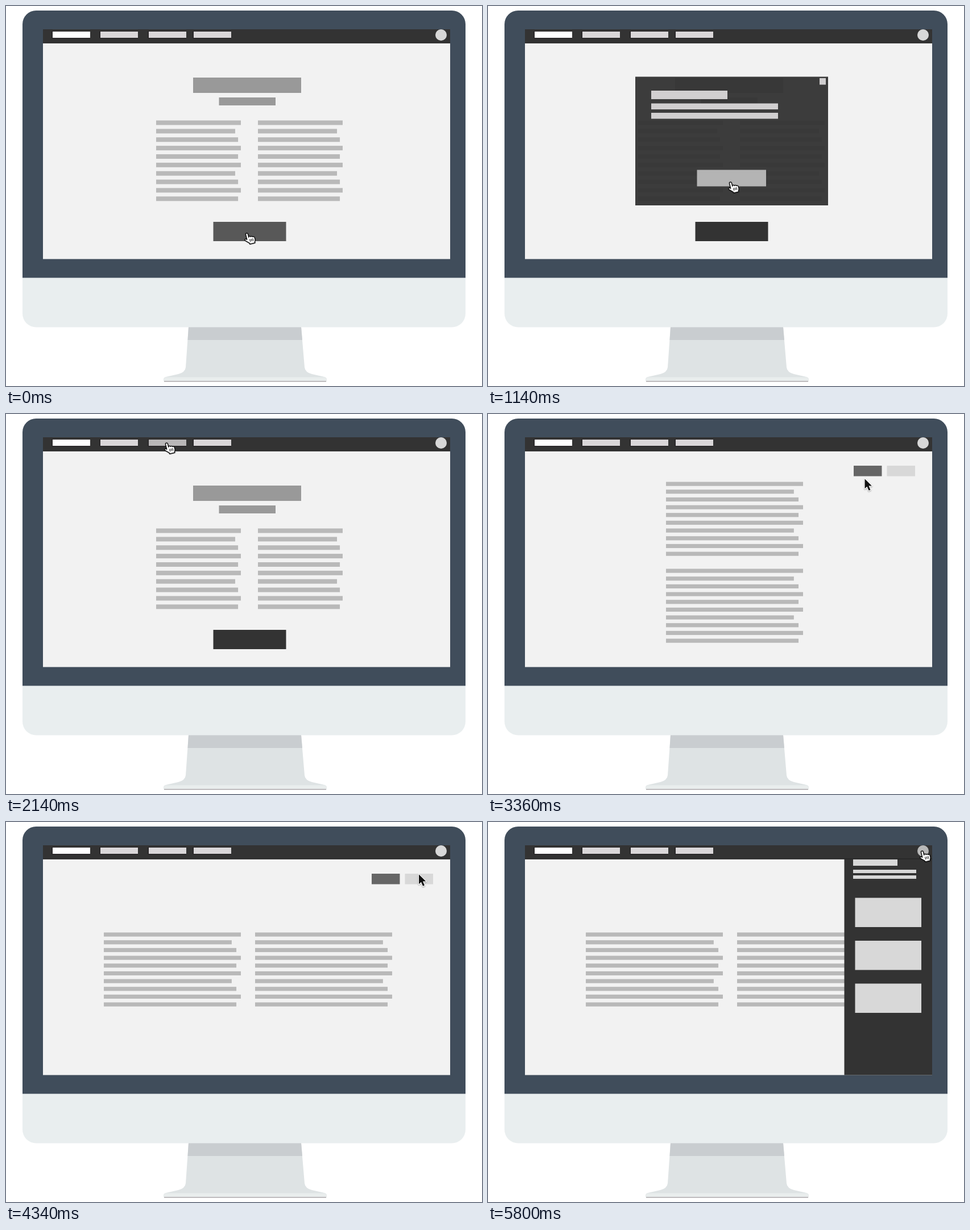
Animation, 837 px wide and 669 px high, one loop 6300 ms. Source, as an HTML page with a canvas:

```html
<!DOCTYPE html>
<html lang="en">
<head>
<meta charset="utf-8">
<title>Wireframe on a desktop screen</title>
<style>
  html, body { margin: 0; width: 100%; height: 100%; overflow: hidden; background: #fff; }
  canvas { display: block; }
</style>
</head>
<body>
<canvas id="stage" width="837" height="669"></canvas>
<script>
const ctx = document.getElementById('stage').getContext('2d');
const LOOP = 6300, STEP = 20;
const DARK = '#333', PANEL = '#f2f2f2', LIGHT = '#dad7d9', CARD = '#d8d8d8', HOVER = '#b9b7b8', LINE = '#b9b9b9';
const ROWS = [1, .933, .967, 1, .967, 1, .933, .967, 1, .967];

const HAND = new Path2D('M-2 2Q-2 0 0 0Q2 0 2 2V8Q2 6.2 4 6.4Q5.6 6.6 5.6 8Q6 7 7.4 7.4Q9 7.6 9 9Q10 8.2 11 9Q12 9.6 12 11V14Q12 16 10.5 18V20H1V18.5L-5 12.5Q-6.6 10.4 -5 9.6Q-3.6 9 -2 11Z');
const CREASES = new Path2D('M3 11.5V16M5.6 11.5V16M8.2 11.5V16');
const ARROW = new Path2D('M0 0V17L4 13.4L7 20.5L10 19.2L7 12.2H12.4Z');
const NECK = new Path2D('M321 565H519L525 636Q526 645 538 648L560 653Q564 654 564 658H277Q277 654 281 653L303 648Q315 645 316 636Z');
const SHADE = new Path2D('M321 565H519L521 588H319.5Z');

// Cursor legs: start, end, from, to, easing power, sag of the path
const MOVES = [
  [320, 840, [423, 400], [426, 310], 2.1, 0],
  [1260, 2120, [426, 310], [282, 51], 2.24, 0],
  [2820, 3720, [282, 51], [721, 98], 2.2, 300],
  [4260, 5180, [721, 98], [763, 51], 1.4, -110]
];

const clamp = v => Math.min(1, Math.max(0, v));
const lerp = (a, b, p) => a + (b - a) * p;
const ease = (t, start, length) => (1 - Math.cos(Math.PI * clamp((t - start + STEP) / length))) / 2;

function box(x, y, w, h, color) {
  ctx.fillStyle = color;
  ctx.fillRect(x, y, w, h);
}

function roundBox(x, y, w, h, radii, color) {
  ctx.fillStyle = color;
  ctx.beginPath();
  ctx.roundRect(x, y, w, h, radii);
  ctx.fill();
}

function fillPath(path, color) {
  ctx.fillStyle = color;
  ctx.fill(path);
}

function lines(x, y, width, pitch, height) {
  ROWS.forEach((r, i) => box(x, y + i * pitch, width * r, height, LINE));
}

function monitor() {
  box(0, 0, 837, 669, '#fff');
  fillPath(NECK, '#dee3e4');
  fillPath(SHADE, '#c9cdd0');
  roundBox(277, 653.5, 287, 8, [5, 5, 2, 2], '#e9eded');
  box(278, 660, 285, 1.6, '#b3afb2');
  roundBox(29, 8, 779, 471, [24, 24, 0, 0], '#404d5b');
  roundBox(29, 478.5, 779, 87, [0, 0, 24, 24], '#e9eeef');
}

function navBar(t) {
  box(65, 41, 716, 24.5, DARK);
  box(65, 64, 716, 1.5, '#262626');
  [82, 166, 251, 330].forEach((x, i) => {
    const hot = i === 2 && t >= 2120 && t < 2820;
    box(x - 1.5, 44, 67.5, 13.5, '#272527');
    box(x, 45, 66, 11, i === 0 ? '#fff' : hot ? HOVER : LIGHT);
  });
  ctx.fillStyle = t >= 5200 ? '#b8b8b8' : CARD;
  ctx.beginPath();
  ctx.arc(765, 51, 10, 0, 7);
  ctx.fill();
}

function article(t) {
  box(329, 126, 190, 27, '#999');
  box(374.5, 161, 99.5, 14, '#999');
  [264, 443].forEach(x => lines(x, 201.5, 149, 14.87, 8));
  const g = t < 180 ? 88 : lerp(88, 51, ease(t, 180, 140));
  box(364.5, 380, 128, 34, `rgb(${g},${g},${g})`);
}

function modal(t) {
  const alpha = t < 180 ? 0 : t < 1140 ? ease(t, 180, 140) : 1 - ease(t, 1140, 140);
  if (!alpha) return;
  ctx.globalAlpha = alpha;
  box(259, 124.5, 339, 226.5, DARK);
  box(287, 149, 134, 15, LIGHT);
  box(287, 171.5, 223, 10.5, LIGHT);
  box(287, 188, 223, 10.5, LIGHT);
  box(583, 127, 11, 11.5, LIGHT);
  box(367.5, 288.5, 121.5, 29, t >= 860 ? '#bbb' : CARD);
  ctx.globalAlpha = 1;
}

function reader(t) {
  const p = t < 4140 ? 0 : ease(t, 4140, 140);
  lines(lerp(313, 172, p), lerp(119.5, 194.5, p), 241, 13.67, 7.2);
  lines(lerp(313, 438, p), lerp(272.5, 194.5, p), 241, 13.67, 7.2);
  ctx.globalAlpha = 1 - p * (1 - p);
  box(643, 91, 49.5, 18.5, '#666');
  box(701.5, 91, 49.5, 18.5, CARD);
  ctx.globalAlpha = 1;
}

function sidebar(t) {
  if (t < 5620) return;
  ctx.save();
  ctx.beginPath();
  ctx.rect(65, 65, 716, 380.5);
  ctx.clip();
  ctx.translate(155 * (1 - ease(t, 5620, 200)), 0);
  box(626.5, 65, 155, 381, DARK);
  box(642, 65.5, 78, 11.5, CARD);
  box(642, 84, 111, 6, CARD);
  box(642, 94, 111, 6, CARD);
  [133.5, 209, 284.5].forEach(y => box(645.5, y, 116.5, 51.5, CARD));
  ctx.restore();
}

function cursorAt(t) {
  let [x, y] = MOVES[0][2];
  for (const [start, end, a, b, power, sag] of MOVES) {
    if (t < start) break;
    const p = 1 - Math.pow(1 - clamp((t - start) / (end - start)), power);
    x = lerp(a[0], b[0], p);
    y = lerp(a[1], b[1], p) + sag * p ** 4 * (1 - p);
  }
  return [x, y];
}

function cursor(t) {
  const moving = MOVES.some(m => t >= m[0] && t < m[1] + STEP);
  ctx.save();
  ctx.translate(...cursorAt(t));
  ctx.lineJoin = 'round';
  ctx.shadowColor = 'rgba(0,0,0,.35)';
  ctx.shadowBlur = 2;
  ctx.shadowOffsetY = 1;
  if (moving) {
    ctx.strokeStyle = '#fff';
    ctx.lineWidth = 2.6;
    ctx.stroke(ARROW);
    ctx.shadowColor = 'transparent';
    fillPath(ARROW, '#111');
  } else {
    ctx.rotate(-.24);
    ctx.strokeStyle = '#111';
    ctx.lineWidth = 1.5;
    fillPath(HAND, '#fff');
    ctx.shadowColor = 'transparent';
    ctx.stroke(HAND);
    ctx.lineWidth = 1.1;
    ctx.stroke(CREASES);
  }
  ctx.restore();
}

function draw(now) {
  const t = Math.floor((now % LOOP) / STEP) * STEP;
  monitor();
  box(65, 65, 716, 380.5, PANEL);
  if (t < 2460) {
    article(t);
    modal(t);
  } else {
    reader(t);
  }
  sidebar(t);
  navBar(t);
  cursor(t);
}

function tick() {
  draw(performance.now());
  requestAnimationFrame(tick);
}
tick();
</script>
</body>
</html>
```
